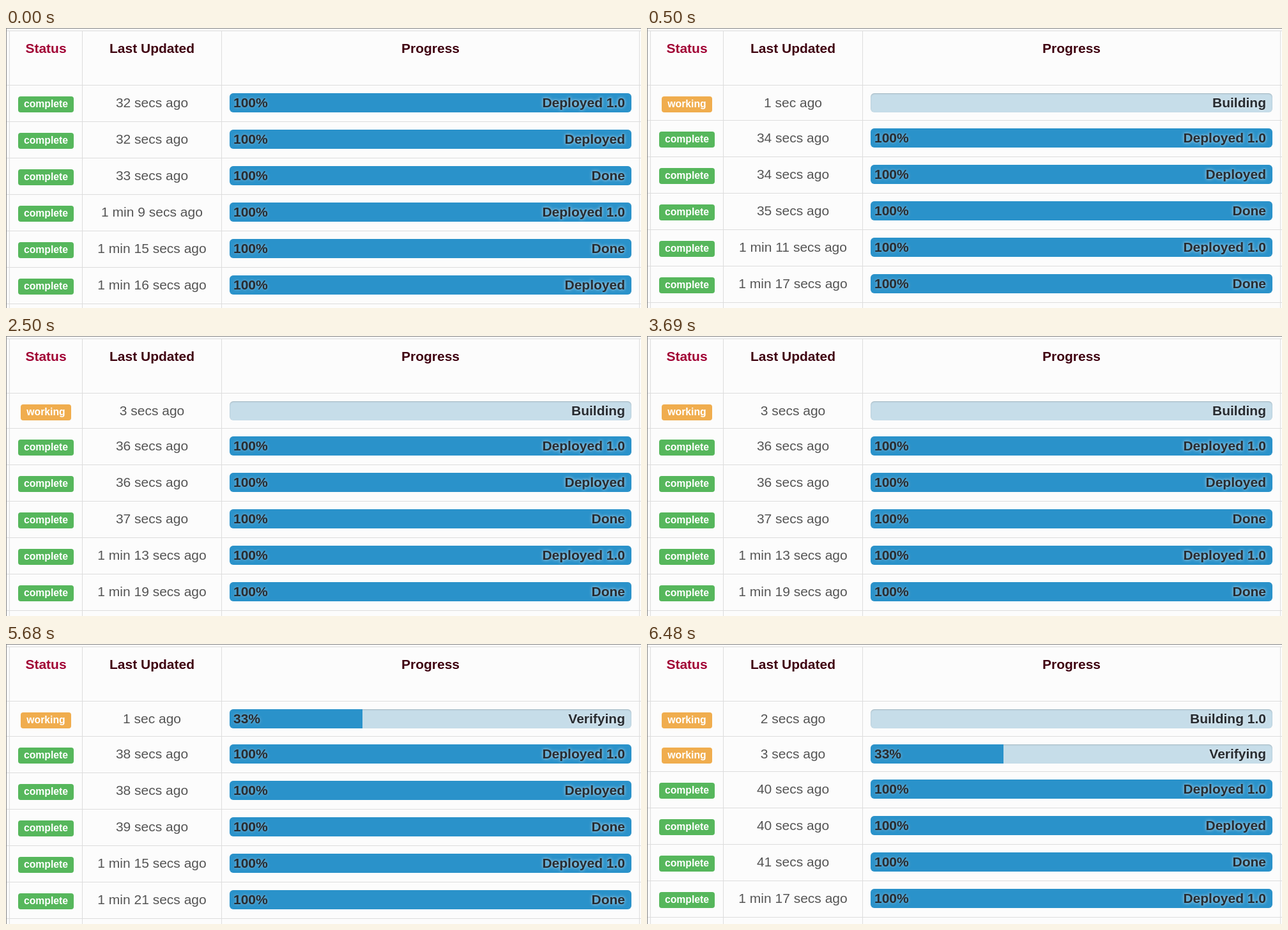
Write an HTML page that moves like this. It is 994x438 px and loops after 8000 ms.

```html
<!DOCTYPE html>
<html lang="en">
<head>
<meta charset="utf-8">
<title>Job status</title>
<style>
html, body { margin: 0; width: 100%; height: 100%; overflow: hidden; background: #fcfcfc; }
#stage {
  position: relative; width: 994px; height: 438px; overflow: hidden;
  font: 21px/30px "Liberation Sans", Arial, sans-serif; color: #555; white-space: nowrap;
}
#stage div { position: absolute; box-sizing: border-box; }
.v { top: 4px; width: 1px; height: 434px; background: #ddd; }
.h { left: 1px; width: 993px; height: 1px; background: #ddd; }
.edge { background: #858585; }
.head { top: 17px; font-weight: bold; color: #3f0010; text-align: center; }
.row { left: 0; width: 994px; height: 30px; }
.status { left: 6px; width: 113px; }
.age { left: 120px; width: 217px; text-align: center; }
.progress { left: 338px; width: 653px; }
.badge {
  top: 5px; height: 25px; border-radius: 4px; color: #fff; text-align: center;
  font: bold 15.75px/24px "Liberation Sans", Arial, sans-serif;
}
.complete { left: 19px; width: 87px; background: #56b75c; }
.working { left: 23px; width: 79px; background: #f0ad4e; }
.bar {
  left: 350px; width: 629px; height: 30px; border-radius: 6px; overflow: hidden;
  background: #c6dde9; box-shadow: inset 0 1px 2px rgba(0, 0, 0, .18);
}
.fill { left: 0; top: 0; height: 30px; background: #2a92ca; }
.pct, .note { font-weight: bold; color: #272b30; }
.pct { left: 6px; text-shadow: 0 0 5px rgba(190, 205, 215, .65); }
.note { right: 10px; text-shadow: 0 0 5px rgba(230, 235, 240, .9); }
</style>
</head>
<body>
<div id="stage">
  <div class="edge" style="left:0;top:0;width:994px;height:1px"></div>
  <div class="edge" style="left:0;top:0;width:1px;height:438px"></div>
  <div class="h" style="top:4px"></div>
  <div class="h" style="top:89px"></div>
  <div class="v" style="left:5px"></div>
  <div class="v" style="left:119px"></div>
  <div class="v" style="left:337px"></div>
  <div class="v" style="left:991px"></div>
  <div class="head status" style="color:#a10034">Status</div>
  <div class="head age">Last Updated</div>
  <div class="head progress">Progress</div>
  <div id="rows"></div>
</div>
<script>
const LOOP = 8000, TICK = 2, VISIBLE = 6;

// Finished jobs: age in seconds at the first step, and result
const finished = [
  [32, 'Deployed 1.0'], [32, 'Deployed'], [33, 'Done'],
  [69, 'Deployed 1.0'], [75, 'Done'], [76, 'Deployed']
];

// Each step: start time and running jobs as [age, percent, stage]
const steps = [
  [0, []],
  [500, [[1, 0, 'Building']]],
  [2500, [[3, 0, 'Building']]],
  [4490, [[1, 33, 'Verifying']]],
  [6480, [[2, 0, 'Building 1.0'], [3, 33, 'Verifying']]]
];

const unit = (n, name) => `${n} ${name}${n === 1 ? '' : 's'}`;
const ageText = s =>
  (s >= 60 ? unit(Math.floor(s / 60), 'min') + ' ' : '') + unit(s % 60, 'sec') + ' ago';

function rowHtml([age, pct, note], y) {
  const state = pct === 100 ? 'complete' : 'working';
  const fill = pct ? `<div class="fill" style="width:${pct === 100 ? 629 : 208}px"></div>
    <div class="pct">${pct}%</div>` : '';
  return `<div class="row" style="top:${y + 13}px">
    <div class="badge ${state}">${state}</div>
    <div class="age">${ageText(age)}</div>
    <div class="bar">${fill}<div class="note">${note}</div></div>
  </div>`;
}

function render(step) {
  const done = finished.map(([age, note]) => [age + TICK * step, 100, note]);
  let y = 89, html = '';
  for (const job of [...steps[step][1], ...done].slice(0, VISIBLE)) {
    html += rowHtml(job, y);
    y += job[1] === 100 ? 57 : 55;
    html += `<div class="h" style="top:${y}px"></div>`;
  }
  document.getElementById('rows').innerHTML = html;
}

let shown = -1;
const start = performance.now();
function frame() {
  const t = (performance.now() - start) % LOOP;
  const step = steps.filter(s => s[0] <= t).length - 1;
  if (step !== shown) render(shown = step);
  requestAnimationFrame(frame);
}
frame();
</script>
</body>
</html>
```
